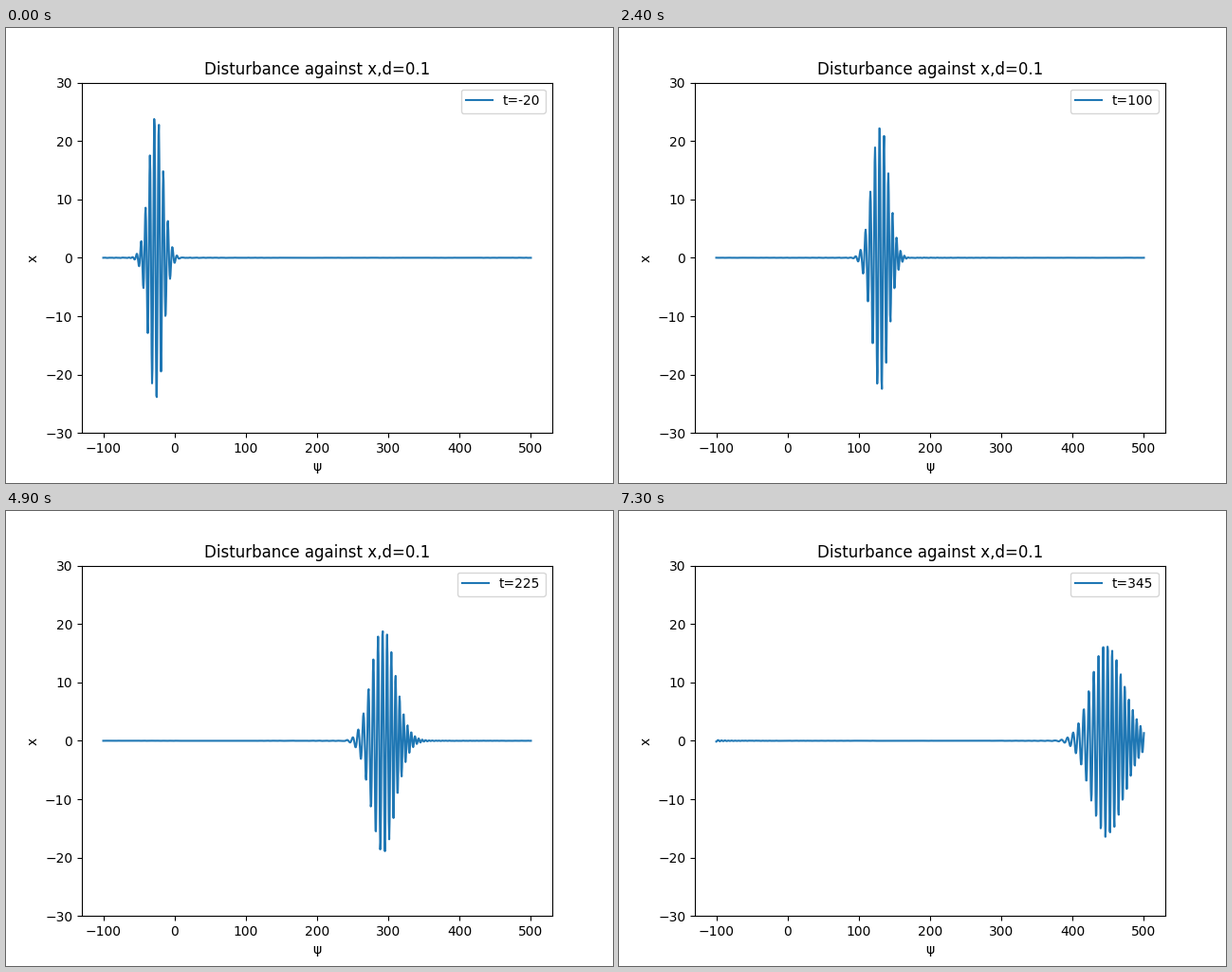
Write a matplotlib script that moves like this. It is 640 px wide and 480 px high and loops after 7.4 s.

```python
import numpy as np
import matplotlib.pyplot as plt
from matplotlib.animation import FuncAnimation

FRAMES, INTERVAL = 74, 100
T_START, T_STEP = -20, 5
D = 0.1        # dispersion coefficient
K0 = 1.0       # central wavenumber
SIGMA = 0.1    # spectral width

x = np.linspace(-100, 500, 1000)
k = np.linspace(0.7, 1.3, 61)
omega = k + D * k**3
weight = np.exp(-(k - K0)**2 / (2 * SIGMA**2))
kx = np.outer(x, k)


def packet(t):
    """Gaussian-weighted sum of plane waves at time t."""
    return np.cos(kx - omega * t) @ weight


fig, ax = plt.subplots(figsize=(6.4, 4.8), dpi=100)
line, = ax.plot(x, packet(T_START), label=f"t={T_START}")
ax.set_ylim(-30, 30)
ax.set_title("Disturbance against x,d=0.1")
ax.set_xlabel("ψ")
ax.set_ylabel("x")
label = ax.legend(loc="upper right").get_texts()[0]


def update(i):
    t = T_START + T_STEP * i
    line.set_ydata(packet(t))
    label.set_text(f"t={t}")
    return line, label


anim = FuncAnimation(fig, update, frames=FRAMES, interval=INTERVAL,
                     repeat=True, repeat_delay=0, blit=False)
plt.show()
```
